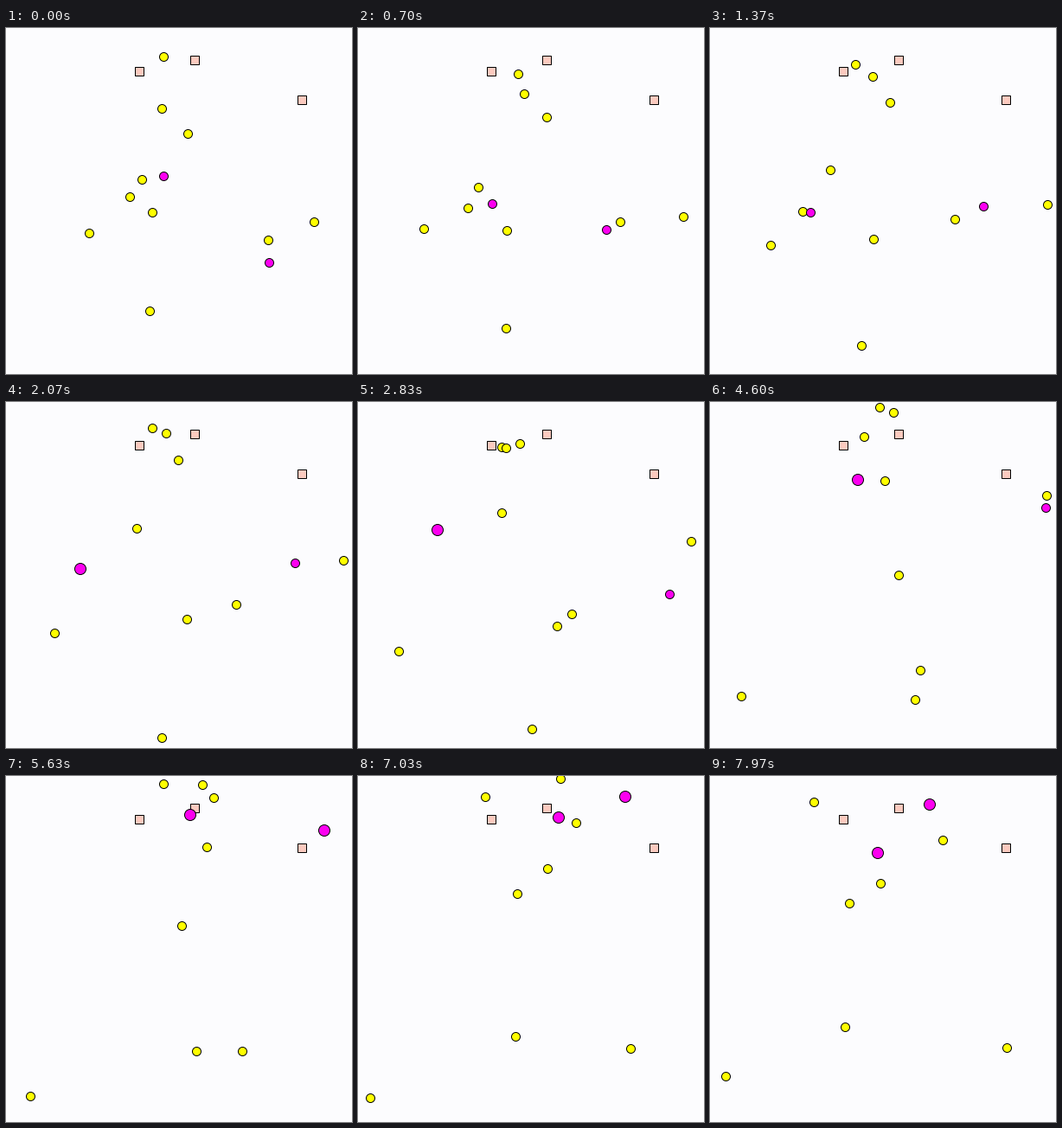
Animation, 400 px wide and 400 px high, one loop 8000 ms. Source, as a matplotlib script:

```python
import numpy as np
import matplotlib.pyplot as plt
from matplotlib.animation import FuncAnimation
from matplotlib.patches import Circle, Rectangle

SIZE = 400
FRAMES, INTERVAL = 400, 20
STEPS = 240
PX = 0.72  # one pixel in points

YELLOW, MAGENTA, PINK = "#ffff00", "#fc00f0", "#fccabf"
MARKS = [0, 41, 62, 107, 169, 211, 239]  # steps at which key points are met

fig = plt.figure(figsize=(4, 4), dpi=100, facecolor="#fcfcfe")
ax = fig.add_axes([0, 0, 1, 1])
ax.set_xlim(-0.5, SIZE - 0.5)
ax.set_ylim(SIZE - 0.5, -0.5)
ax.axis("off")
outline = dict(ec="black", lw=PX)


def bend(start, end, reach, lean):
    """Turning point of a two-leg walk of length reach, on the lean side."""
    chord = end - start
    height = 0.5 * np.sqrt(max(reach**2 - abs(chord)**2, 0))
    normal = 1j * chord / abs(chord)
    side = 1 if (lean * normal.conjugate()).real >= 0 else -1
    return (start + end) / 2 + side * height * normal


def route(points, speed):
    """Walk at steady speed: spare time between key points becomes a turn."""
    chords = [0, *np.diff(points), 0]
    times, places = [0], [points[0]]
    for i, (a, b) in enumerate(zip(points, points[1:])):
        t0, t1 = MARKS[i:i + 2]
        lean = chords[i] - chords[i + 2]
        times += [(t0 + t1) / 2, t1]
        places += [bend(a, b, speed * (t1 - t0), lean), b]
    return times, places


class Walker:
    def __init__(self, points, color, speed, gone=STEPS, fed=STEPS):
        self.times, self.places = route(points, speed)
        self.gone, self.fed = gone, fed
        self.dot = Circle((0, 0), 5, fc=color, zorder=1 + speed, **outline)
        ax.add_patch(self.dot)

    def move(self, step):
        p = np.interp(step, self.times, self.places)
        grown = 0.5 if step >= self.fed else 0
        self.dot.center = round(p.real) - grown, round(p.imag) - grown
        self.dot.radius = 5 + 3 * grown
        self.dot.set_visible(step < self.gone)


def prey(*points, eaten=STEPS):
    return Walker(points, YELLOW, 1, gone=eaten)


def hunter(*points, fed):
    return Walker(points, MAGENTA, 2, fed=fed)


for x, y in [(154, 50), (218, 37), (342, 83)]:
    ax.add_patch(Rectangle((x - 5, y - 5), 10, 10, fc=PINK, snap=False,
                           joinstyle="miter", **outline))

FIRST_MEAL, SECOND_MEAL = 43, 140

walkers = [
    prey(182+33j, 168+42j, 169+30j, 147+41j, 182+9j, 147+24j, 120+30j),
    prey(180+93j, 188+56j, 185+36j, 182+34j, 227+10j, 234+3j, 258-12j),
    prey(210+122j, 208+86j, 199+67j, 208+43j, 240+25j, 252+54j, 269+74j),
    prey(157+175j, 139+164j, 151+146j, 184+116j, 232+82j, 219+107j, 197+124j),
    prey(143+195j, 107+212j, 89+220j, eaten=FIRST_MEAL),
    prey(169+213j, 189+244j, 209+251j, 239+279j, 273+318j, 315+315j, 343+314j),
    prey(96+237j, 70+251j, 56+267j, 44+310j, 28+370j, 14+372j, 18+347j),
    prey(303+245j, 283+221j, 266+234j, 233+228j, 203+173j, 184+136j, 161+147j),
    prey(356+224j, 390+204j, 390+183j, 389+139j, 389+77j, eaten=SECOND_MEAL),
    prey(166+327j, 175+367j, 180+388j, 209+358j, 220+318j, 182+301j, 156+290j),
    hunter(182+171j, 116+213j, 86+193j, 135+141j, 213+45j, 232+48j, 194+89j,
           fed=FIRST_MEAL),
    hunter(304+271j, 316+206j, 334+186j, 380+183j, 368+63j, 309+24j, 254+33j,
           fed=SECOND_MEAL),
]


def update(frame):
    step = int(frame * STEPS / FRAMES + 0.5)
    for w in walkers:
        w.move(step)
    return [w.dot for w in walkers]


anim = FuncAnimation(fig, update, frames=FRAMES, interval=INTERVAL,
                     init_func=lambda: update(0), repeat=True, repeat_delay=0)
plt.show()
```
